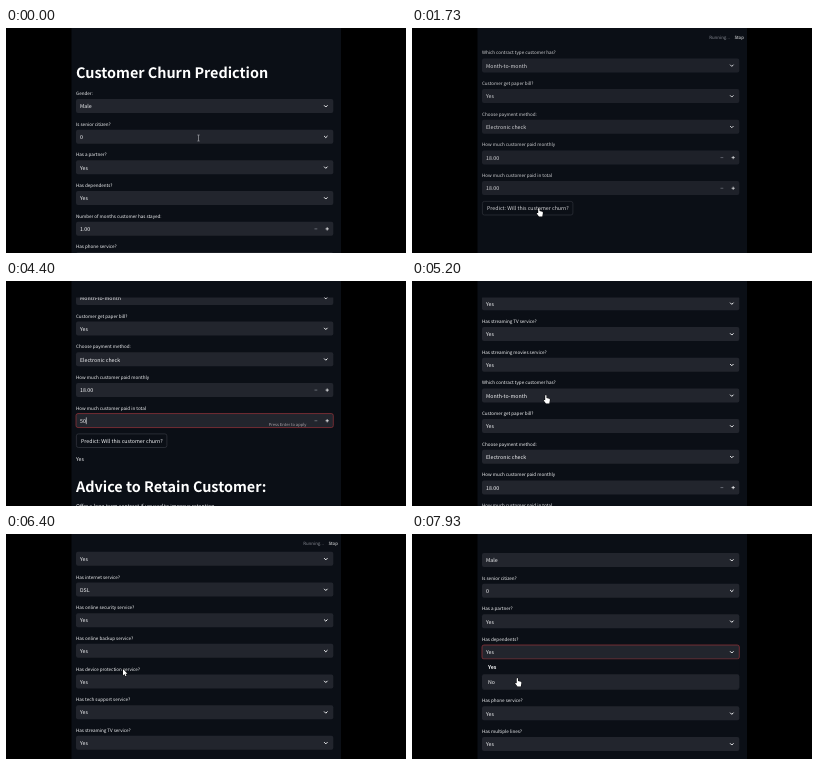
These frames come from a looping animation (400x225 px, 8000 ms). An HTML page with a canvas:

```html
<!DOCTYPE html>
<html lang="en">
<head>
<meta charset="utf-8">
<title>Customer Churn Prediction</title>
<style>
html, body { margin: 0; width: 100%; height: 100%; overflow: hidden; background: #000; }
canvas { display: block; width: 400px; height: 225px; }
</style>
</head>
<body>
<canvas id="stage"></canvas>
<script>
const LOOP = 8000, STEP = 1000 / 15;
const PANEL = '#0b0f16', FIELD = '#22252d', INK = '#f4f5f7', DIM = '#858891', RED = '#98343a';
const FAMILY = '"Noto Sans CJK JP", "Noto Sans CJK SC", "Open Sans", sans-serif';
const LEFT = 70, WIDTH = 257.3, PITCH = 30.67, ROW = 14.7;
const DEPENDENTS = 3, CONTRACT = 14, TOTAL = 18;

const fields = [
  ['Gender:', 'Male'], ['Is senior citizen?', '0'], ['Has a partner?', 'Yes'],
  ['Has dependents?', 'Yes'], ['Number of months customer has stayed:', '1.00', true],
  ['Has phone service?', 'Yes'], ['Has multiple lines?', 'Yes'],
  ['Has internet service?', 'DSL'], ['Has online security service?', 'Yes'],
  ['Has online backup service?', 'Yes'], ['Has device protection service?', 'Yes'],
  ['Has tech support service?', 'Yes'], ['Has streaming TV service?', 'Yes'],
  ['Has streaming movies service?', 'Yes'], ['Which contract type customer has?', 'Month-to-month'],
  ['Customer get paper bill?', 'Yes'], ['Choose payment method:', 'Electronic check'],
  ['How much customer paid monthly', '18.00', true], ['How much customer paid in total', '18.00', true]
];

// time, scroll, pointer x, pointer y, pointer shape from then on
const keys = [
  [0, 0, 192.5, 110, 'beam'], [267, 95, 175, 112, 'arrow'], [733, 436, 144, 114, 'arrow'],
  [867, 436, 144, 114, 'arrow'], [1133, 470, 125, 180, 'hand'], [2400, 470, 125, 180, 'beam'],
  [2667, 381, 130.5, 156, 'beam'], [2800, 381, 130.5, 156, 'beam'], [3333, 490.5, 120, 141, 'none'],
  [4400, 490.5, 120, 141, 'none'], [4533, 475, 122, 138, 'beam'], [5067, 393, 132, 114, 'beam'],
  [5200, 393, 132, 114, 'hand'], [5400, 393, 132, 153, 'hand'], [5533, 393, 132, 153, 'hand'],
  [5600, 393, 132, 154, 'hand'], [5800, 393, 132, 154, 'arrow'], [6133, 344, 137, 149, 'arrow'],
  [6533, 200, 110, 130, 'beam'], [6667, 200, 110, 130, 'beam'], [6933, 44, 91.5, 106, 'beam'],
  [7200, 46, 91.5, 106, 'beam'], [7467, 46, 91.5, 106, 'beam'], [7600, 52, 98, 119, 'beam'],
  [7800, 52, 98, 119, 'hand'], [7933, 52, 103.5, 144, 'hand'], [8000, 52, 103.5, 144, 'hand']
];

const canvas = document.getElementById('stage');
const ctx = canvas.getContext('2d');
const ratio = window.devicePixelRatio || 1;
canvas.width = 400 * ratio;
canvas.height = 225 * ratio;
ctx.textRendering = 'geometricPrecision';

function text(str, x, y, size = 5.25, color = INK, weight = 500, align = 'left') {
  ctx.font = `${weight} ${size}px ${FAMILY}`;
  ctx.fillStyle = color;
  ctx.textAlign = align;
  ctx.fillText(str, x, y);
}

function heading(str, y) {
  text(str, LEFT, y, 14.4, '#fff', 700);
}

function box(x, y, w, h, fill, stroke) {
  ctx.beginPath();
  ctx.roundRect(x, y, w, h, 2);
  if (fill) { ctx.fillStyle = fill; ctx.fill(); }
  if (stroke) { ctx.strokeStyle = stroke; ctx.lineWidth = 0.7; ctx.stroke(); }
}

function line(points, color, width) {
  ctx.beginPath();
  points.forEach(([x, y]) => ctx.lineTo(x, y));
  ctx.strokeStyle = color;
  ctx.lineWidth = width;
  ctx.stroke();
}

function pose(t) {
  let i = 0;
  while (i < keys.length - 2 && keys[i + 1][0] <= t + 1) i++;
  const a = keys[i], b = keys[i + 1];
  const u = Math.min(1, Math.max(0, (t - a[0]) / (b[0] - a[0])));
  const e = u * u * (3 - 2 * u);
  const [scroll, x, y] = [1, 2, 3].map(k => a[k] + (b[k] - a[k]) * e);
  return { scroll, x, y, shape: a[4] };
}

function valueOf(i, t) {
  if (i === CONTRACT && t >= 5795) return 'Two year';
  if (i === TOTAL && t >= 3395) return t < 4395 ? '5' : t < 4530 ? '50' : '50.00';
  return fields[i][1];
}

function focusAt(t) {
  if (t >= 3195 && t < 4530) return TOTAL;
  if (t >= 5260 && t < 6460) return CONTRACT;
  return t >= 7795 ? DEPENDENTS : -1;
}

function drawField(i, t, scroll) {
  const mid = 78 + i * PITCH - scroll;
  if (mid < 0 || mid > 245) return;
  const [label, , numeric] = fields[i];
  const value = valueOf(i, t), focused = focusAt(t) === i;
  text(label, LEFT, mid - 11, 4.55);
  box(LEFT, mid - 7, WIDTH, 14, FIELD, focused && RED);
  text(value, 74, mid + 2.3);
  if (focused && (numeric || t < 7000 && t >= 5795)) {
    const x = 74.5 + ctx.measureText(value).width;
    line([[x, mid - 3.2], [x, mid + 3.6]], INK, 0.6);
  }
  if (numeric) {
    line([[308.5, mid + 0.2], [311.3, mid + 0.2]], DIM, 0.7);
    line([[319.6, mid + 0.2], [322.8, mid + 0.2]], INK, 0.8);
    line([[321.2, mid - 1.4], [321.2, mid + 1.8]], INK, 0.8);
    if (focused && t >= 3395) text('Press Enter to apply', 300.5, mid + 5.6, 4.1, '#a8a0a6', 400, 'right');
  } else {
    line([[318.1, mid - 0.7], [319.8, mid + 1], [321.5, mid - 0.7]], INK, 1);
  }
}

function drawMenu(i, options, active, scroll) {
  const top = 85.6 + i * PITCH - scroll;
  box(LEFT, top, WIDTH, options.length * ROW, PANEL);
  options.forEach((name, k) => {
    const y = top + k * ROW;
    if (k === active) box(LEFT, y, WIDTH, ROW, FIELD);
    text(name, 76, y + 9.4, 5.25, INK, k ? 500 : 700);
  });
}

function drawPage(t, scroll) {
  heading('Customer Churn Prediction', 50.2 - scroll);
  ctx.globalAlpha = t > 1590 && t < 2260 ? 0.85 : 1;
  fields.forEach((_, i) => drawField(i, t, scroll));
  box(LEFT + 0.4, 643.4 - scroll, 90.5, 13.6, null, '#353841');
  text('Predict: Will this customer churn?', 75, 652.4 - scroll);
  ctx.globalAlpha = 1;
  if (t > 1860 && t < 4530) {
    text('Yes', LEFT, 670.8 - scroll);
    heading('Advice to Retain Customer:', 701.2 - scroll);
    text('Offer a long-term contract if unused to improve retention.', LEFT, 717.7 - scroll);
  }
  if (t >= 5260 && t < 5795) {
    drawMenu(CONTRACT, ['Month-to-month', 'One year', 'Two year'], t < 5330 ? 0 : t < 5395 ? 1 : 2, scroll);
  }
  if (t >= 7795) drawMenu(DEPENDENTS, ['Yes', 'No'], t < 7860 ? 0 : 1, scroll);
}

const shapes = {
  arrow: new Path2D('M0 0V6.6L1.5 5.2L2.5 7.4L3.5 6.9L2.5 4.8H4.5Z'),
  hand: new Path2D('M1.2 .6Q1.9 -.4 2.5 .6V3L5.4 3.8Q6 4 5.9 5L5.3 8.4H2L-.3 5.6Q-.4 4.6 1.2 5.2Z')
};

function drawPointer({ x, y, shape }) {
  if (shape === 'none') return;
  if (shape === 'beam') {
    line([[x, y - 3], [x, y + 3]], '#a4a6ab', 0.7);
    for (const d of [-3, 3]) line([[x - 1.2, y + d], [x + 1.2, y + d]], '#a4a6ab', 0.6);
    return;
  }
  ctx.save();
  ctx.translate(x, y);
  ctx.strokeStyle = '#000';
  ctx.lineWidth = 0.8;
  ctx.stroke(shapes[shape]);
  ctx.fillStyle = '#fff';
  ctx.fill(shapes[shape]);
  ctx.restore();
}

function draw(now) {
  const t = Math.floor((now % LOOP + 4) / STEP) * STEP;
  const p = pose(t);
  ctx.setTransform(ratio, 0, 0, ratio, 0, 0);
  ctx.fillStyle = '#000';
  ctx.fillRect(0, 0, 400, 225);
  ctx.fillStyle = PANEL;
  ctx.fillRect(65.5, 0, 269.5, 225);
  ctx.save();
  ctx.beginPath();
  ctx.rect(65.5, 16.5, 269.5, 208.5);
  ctx.clip();
  drawPage(t, p.scroll);
  ctx.restore();
  if (t > 1460 && t < 2070 || t > 5860 && t < 6470) {
    text('Running...', 318, 10.5, 4.4, DIM, 400, 'right');
    text('Stop', 332, 10.5, 4.4, INK, 400, 'right');
  }
  drawPointer(p);
}

const start = performance.now();
function tick() {
  draw(performance.now() - start);
  requestAnimationFrame(tick);
}
tick();
</script>
</body>
</html>
```
